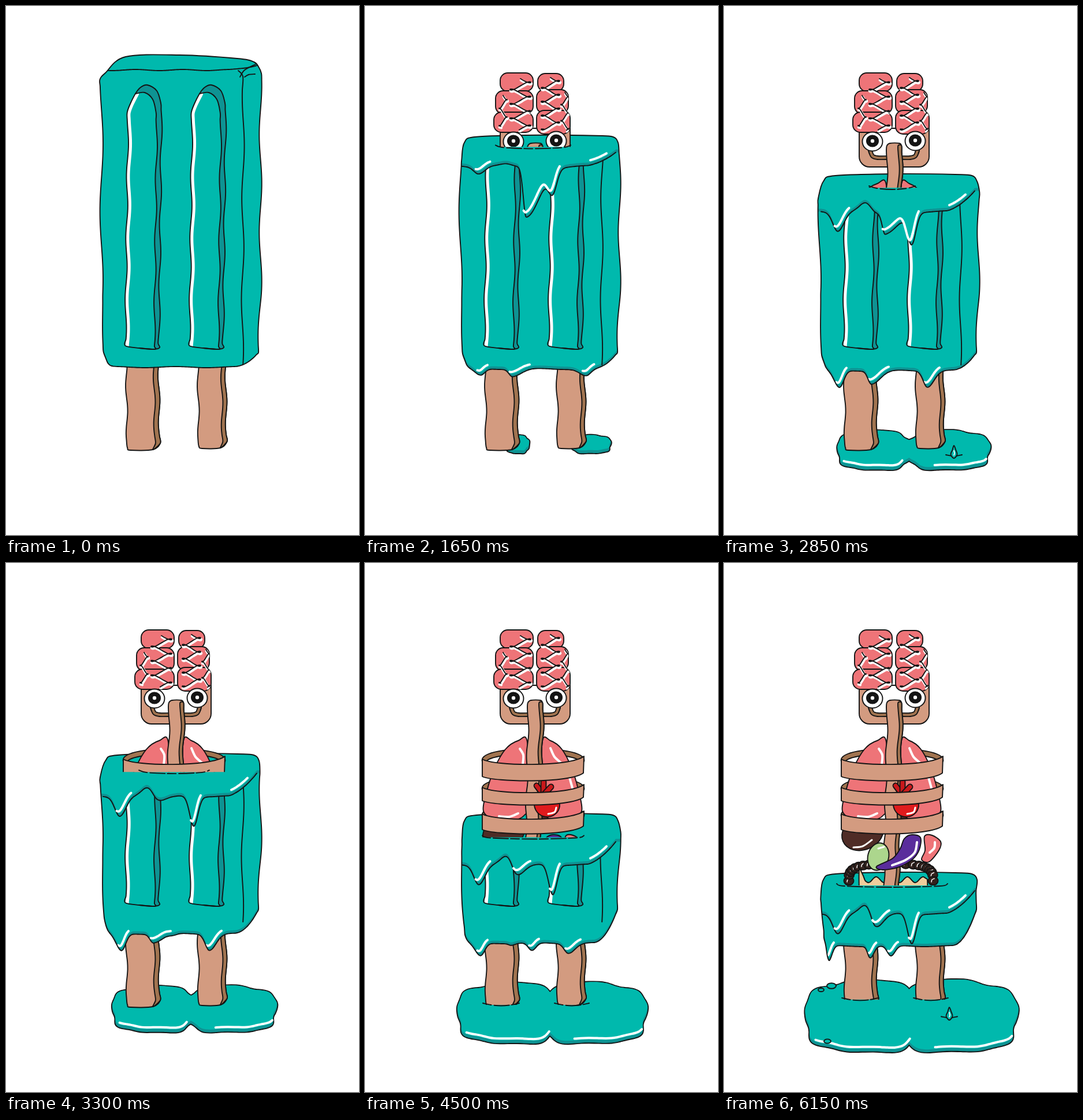
These frames come from a looping animation (611x917 px, 6.3 s). An HTML page with a canvas:

```html
<!DOCTYPE html>
<html lang="en">
<head>
<meta charset="utf-8">
<title>Melting ice pop</title>
<style>
html, body { margin: 0; width: 100%; height: 100%; overflow: hidden; background: #fff; }
canvas { display: block; width: 611px; height: 917px; }
</style>
</head>
<body>
<canvas id="stage" width="611" height="917"></canvas>
<script>
const ctx = document.getElementById('stage').getContext('2d');
const LOOP = 6300, STEP = 150;
const INK = '#141414', TEAL = '#00b9ad', DEEP = '#0e9393', WOOD = '#d39b80', BARK = '#a17450';
const PINK = '#ee7478', WHITE = '#fff', BROWN = '#4f2c26', GUT = '#33221d';
const { sin, cos, exp, min, max, PI } = Math;

// time, back rim, waterline, its half width, front edge, lower edge,
// pool left, pool right, pool half height, reach of each pool lobe past the middle
const keys = [
  [0, 85, 97, 5, 111, 626, 264, 395, 0, -55],
  [900, 191, 206, 69, 237, 628, 264, 395, 0, -55],
  [2250, 250, 275, 62, 310, 630, 229, 450, 28, -21],
  [2850, 291, 315, 40, 356, 632, 196, 461, 34, 6],
  [3900, 382, 425, 89, 469, 657, 167, 479, 48, 22],
  [5100, 486, 526, 87, 577, 661, 152, 498, 57, 25],
  [6150, 536, 559, 96, 608, 664, 140, 509, 62, 30]
];
function stateAt(t) {
  const i = keys.findIndex(key => key[0] > t) - 1;
  const [a, b] = i < 0 ? keys.slice(-2).reverse() : [keys[i], keys[i + 1]];
  const k = (t - a[0]) / (b[0] - a[0]);
  const [, rim, water, waterHalf, front, lower, poolLeft, poolRight, poolHalf, reach] =
    a.map((v, j) => v + (b[j] - v) * k);
  return { t, rim, water, waterHalf, front, lower, poolLeft, poolRight, poolHalf, reach };
}

// A drip swells between `from` and `full`, and may shrink between `fade` and `gone`.
const drip = (x, left, right, depth, from, full, fade = LOOP, gone = LOOP + 1) =>
  ({ x, left, right, depth, from, full, fade, gone });
const frontDrips = [
  drip(197, 12, 15, 34, 900, 2850),
  drip(245, 14, 14, -15, 1200, 2850),
  drip(279, 7, 34, 88, 0, 900, 2250, 3300),
  drip(262, 10, 18, 24, 2400, 5100),
  drip(325, 10, 10, 52, 300, 2250)
];
const lowerDrips = [
  drip(200, 13, 10, 30, 900, 2850, 4200, 5400),
  drip(181, 4, 8, 28, 5000, 6150),
  drip(255, 8, 22, 23, 900, 2250, 3000, 3900),
  drip(253, 6, 9, 20, 4200, 6150),
  drip(289, 9, 10, 18, 3000, 5000),
  drip(383, 16, 11, 22, 900, 2250, 2300, 2850),
  drip(352, 10, 16, 28, 2250, 2850, 3900, 5400)
];
const unit = v => max(0, min(1, v));
const depthAt = (d, t) => d.depth * unit((t - d.from) / (d.full - d.from)) * (1 - unit((t - d.fade) / (d.gone - d.fade)));
const hang = (drips, x, t) => drips.reduce((sum, d) => {
  const u = (x - d.x) / (x < d.x ? d.left : d.right);
  return sum + depthAt(d, t) * exp(-u * u);
}, 0);

const frontEdge = s => x => s.front + sin(x / 13) + hang(frontDrips, x, s.t)
  - min(42, 9 + s.t * 0.01) * unit((x - 385) / 50) ** 1.5;
const lowerEdge = s => x => s.lower + sin(x / 17) + hang(lowerDrips, x, s.t)
  - 14 * exp((173 - x) / 4) - (s.lower - 600) * unit((x - 395) / 42) ** 2;
const leftSide = y => 165.3 + 2.7 * sin((y - 180) / 37.4) + max(0, y - 500) * 0.06;
const rightSide = y => 440.5 + 2.2 * sin((y - 265) / 27) - max(0, y - 500) * 0.03;

function range(from, to, step) {
  const n = max(1, Math.round(Math.abs(to - from) / step));
  return Array.from({ length: n + 1 }, (_, i) => from + (to - from) * i / n);
}
const along = (f, x1, x2, step = 3) => range(x1, x2, step).map(x => [x, f(x)]);
const down = (f, y1, y2, step = 12) => range(y1, y2, step).map(y => [f(y), y]);

function spline(pts, closed = false) {
  const n = pts.length, path = new Path2D();
  const at = i => closed ? pts[(i + n) % n] : pts[max(0, min(n - 1, i))];
  path.moveTo(...pts[0]);
  for (let i = 0; i < (closed ? n : n - 1); i++) {
    const [a, b, c, d] = [at(i - 1), at(i), at(i + 1), at(i + 2)];
    path.bezierCurveTo(b[0] + (c[0] - a[0]) / 6, b[1] + (c[1] - a[1]) / 6,
      c[0] - (d[0] - b[0]) / 6, c[1] - (d[1] - b[1]) / 6, c[0], c[1]);
  }
  if (closed) path.closePath();
  return path;
}
const blob = pts => spline(pts, true);
function oval(x, y, rx, ry = rx, turn = 0) {
  const path = new Path2D();
  path.ellipse(x, y, rx, ry, turn, 0, 2 * PI);
  return path;
}
function box(x1, y1, x2, y2, radius) {
  const path = new Path2D();
  path.roundRect(x1, y1, x2 - x1, y2 - y1, radius);
  return path;
}
function stroke(path, color = INK, width = 1.9) {
  ctx.strokeStyle = color;
  ctx.lineWidth = width;
  ctx.stroke(path);
}
function fill(path, color, rule) {
  ctx.fillStyle = color;
  ctx.fill(path, rule);
}
function shape(path, color, rule) {
  fill(path, color, rule);
  stroke(path);
}
function tube(path, color, width) {
  stroke(path, INK, width + 3.8);
  stroke(path, color, width);
}
function within(path, draw) {
  ctx.save();
  ctx.clip(path);
  draw();
  ctx.restore();
}
// Dark fill with the bright colour lifted, leaving a shaded lower lip.
function glossy(path, lift) {
  fill(path, DEEP);
  within(path, () => {
    ctx.translate(0, -lift);
    fill(path, TEAL);
  });
}
const shine = (pts, width = 4) => stroke(spline(pts), WHITE, width);
function shineDrips(drips, edge, t) {
  for (const d of drips) {
    if (depthAt(d, t) < 9) continue;
    shine(along(edge, d.x - d.left * 0.2, d.x + d.right * 1.5).map(([x, y]) => [x - 3, y - 8]));
  }
}
function dashes(y, x1, x2, sag = 4) {
  ctx.setLineDash([15, 5, 26, 4]);
  stroke(spline([[x1, y - sag], [x1 + 14, y], [(x1 + x2) / 2, y + sag / 2], [x2 - 14, y], [x2, y - sag]]));
  ctx.setLineDash([]);
}

// Wooden bar with a darker right-hand side.
function slab(x, width, side, top, bottom, lean = 0) {
  const edge = dx => y => x + dx + lean * (y - top) + 1.6 * sin((y - 680) / 13 + dx / 40);
  const front = edge(width), back = edge(width + side), left = edge(0);
  const faces = blob([...down(left, top + 5, bottom - 4), [left(bottom) + 5, bottom], [front(bottom) - 5, bottom - 1],
    ...down(back, bottom - 12, top + 5), [back(top) - 4, top], [left(top) + 5, top]]);
  const shade = blob([...down(front, top + 4, bottom - 12), [front(bottom) - 5, bottom - 1],
    ...down(back, bottom - 12, top + 4)]);
  return () => {
    shape(faces, WOOD);
    shape(shade, BARK);
  };
}
const sticks = [slab(208, 48, 8, 600, 770, 0.01), slab(332, 41, 7, 600, 767, 0.01)];

function drawSticks(t) {
  const wet = t > 3300, level = wet ? 766 - max(0, t - 5100) / 115 : 780;
  within(box(0, 0, 611, level, 0), () => sticks.forEach(draw => draw()));
  if (wet) [[204, 267], [328, 388]].forEach(span => dashes(level, ...span, 3));
}

function lobe(x1, x2, half, seed) {
  const cx = (x1 + x2) / 2, cy = 751 + half * 0.57;
  const round = v => Math.sign(v) * Math.abs(v) ** 0.78;
  return range(0, 2 * PI, 0.1).slice(0, -1).map(a => {
    const r = 1 + 0.035 * sin(5 * a + seed) + 0.025 * sin(9 * a - seed);
    return [cx + (x2 - x1) / 2 * r * round(cos(a)), cy + half * r * round(sin(a))];
  });
}
function drawPools({ t, poolLeft, poolRight, poolHalf, reach }) {
  if (poolHalf < 5) return;
  const lobes = [lobe(poolLeft, 320 + reach, poolHalf, 2), lobe(320 - reach, poolRight, poolHalf, 4)];
  const whole = new Path2D();
  lobes.forEach(pts => whole.addPath(blob(pts)));
  stroke(whole, INK, 3.8);
  glossy(whole, 5);
  if (poolHalf > 18) lobes.forEach((pts, i) => shine(pts.slice(8 - 2 * i, 25 - 6 * i).map(([x, y]) => [x, y - 8])));
  if (t > 4700) [[186, 733, 8], [168, 740, 5], [179, 829, 6]].forEach(([x, y, r]) => shape(oval(x, y, r, r * 0.6), TEAL));
}

function makeGroove(x) {
  const edge = dx => y => x + dx - 0.011 * (y - 200) + 1.5 * sin(y / 17 + dx);
  const left = [...down(edge(0), 589, 185), [x + 3, 172], [x + 13, 152]];
  const inner = [[x + 29, 150], [x + 43, 162], ...down(edge(50), 185, 590), [x + 47, 595], [x + 20, 593]];
  const outer = [[x + 22, 141], [x + 34, 137], [x + 50, 147], ...down(edge(58), 168, 585), [x + 55, 592], [x + 45, 595], [x + 20, 593]];
  return { left: spline(left), inner: spline([left[left.length - 1], ...inner]),
    face: spline([...left, ...inner]), hole: blob([...left, ...outer]) };
}
const grooves = [makeGroove(211), makeGroove(322)];
function drawGroove({ left, inner, face, hole }) {
  fill(hole, DEEP);
  fill(face, TEAL);
  within(face, () => stroke(left, WHITE, 12));
  stroke(inner);
  stroke(hole);
}
const sideEdge = spline([[402, 112], [410, 122], ...down(y => 411.5 + 2 * sin((y - 200) / 28) - y / 250, 145, 622)]);
const cornerMarks = [spline([[405, 123], [413, 111], [432, 101]]), spline([[413, 123], [420, 119], [431, 118]])];

function drawBody(s) {
  const { t, rim } = s;
  const front = frontEdge(s), lower = lowerEdge(s), slant = 1 - unit(t / 900);
  const body = blob([...along(lower, 173, 437), ...down(rightSide, 588, rim + 32),
    [438, rim + 13 + 9 * slant], [429, rim + 3 + 9 * slant], [400, rim + 1 + 5 * slant], [300, rim],
    [193 + 14 * slant, rim + 3], [172, rim + 13 + 18 * slant], ...down(leftSide, rim + 42, lower(173) - 12)]);
  glossy(body, min(5, t / 300));

  within(body, () => {
    if (t < 4650) grooves.forEach(drawGroove);
    if (t < 5500) stroke(sideEdge);
    const edge = along(front, 168, 434, 2);
    const cover = spline(edge);
    cover.lineTo(611, front(434));
    [[611, 0], [0, 0], [0, front(168)]].forEach(p => cover.lineTo(...p));
    cover.closePath();
    glossy(cover, min(5, t / 160));
    stroke(spline(edge));
    if (t < 150) cornerMarks.forEach(mark => stroke(mark));
    shineDrips(frontDrips, front, t);
    if (t > 1500) shine(along(front, 392, 420).map(([x, y]) => [x - 2, y - 8]));
    shineDrips(lowerDrips, lower, t);
  });
  stroke(body);
}

const mirror = (pts, axis, scale = 1) => pts.map(([x, y]) => [axis + (axis - x) * scale, y]);
const eyes = [[257, 235], [331, 234]];
const lungPts = [[281, 311], [265, 308], [243, 323], [224, 356], [211, 395], [205, 430], [225, 445], [257, 446], [276, 437], [281, 418]];
const grinPts = [[253, 250], [257, 260], [266, 263], [285, 263]];
const brainLobes = [
  [[234, 116, 291, 148], [226, 147, 291, 187], [223, 184, 291, 219]],
  [[299, 117, 344, 148], [297, 145, 352, 186], [297, 181, 355, 222]]
];
// Serpentine crease with bulging bends.
const crease = (cx, swing, wave, top, bottom) => spline(range(0, bottom - top, 2).map(d => {
  const a = 2 * PI * d / wave;
  return [cx + swing * sin(a), top + d + 3.5 * sin(2 * a)];
}));
const creases = [
  [crease(269, 18, 25, 126, 214), crease(239, 7, 30, 155, 212)],
  [crease(321, 16, 24, 124, 217), crease(346, 7, 28, 150, 218)]
];
const purplePts = [[340, 476], [325, 471], [312, 478], [305, 495], [292, 512], [264, 526], [275, 532], [303, 527], [326, 514], [338, 497]];
const pinkPts = [[347, 474], [360, 472], [375, 483], [372, 498], [355, 518], [342, 514], [348, 498]];
const ribs = [[342, 28], [391, 21], [437, 25]];
const spine = slab(283, 20, 6, 238, 580, -0.02);

function ribBack(y) {
  const ring = new Path2D();
  ring.ellipse(291, y, 84, 16, 0, PI, 0);
  tube(ring, BARK, 7);
}
function ribFront(y, height) {
  const band = new Path2D(), low = y + height;
  band.moveTo(203, y - 2);
  band.bezierCurveTo(222, y + 10, 355, y + 12, 379, y - 7);
  band.lineTo(378, low - 6);
  band.bezierCurveTo(355, low + 12, 222, low + 10, 203, low);
  band.closePath();
  shape(band, WOOD);
}

function drawHead() {
  const jaw = box(234, 212, 355, 279, [0, 0, 18, 18]);
  jaw.addPath(box(250, 212, 338, 263, [0, 0, 14, 14]));
  shape(jaw, WOOD, 'evenodd');
  [grinPts, mirror(grinPts, 294)].forEach(pts => tube(spline(pts), BARK, 4));
  brainLobes.forEach((half, i) => {
    const whole = new Path2D();
    half.forEach(lobeBox => {
      const part = box(...lobeBox, 13);
      shape(part, PINK);
      whole.addPath(part);
    });
    within(whole, () => creases[i].forEach(line => {
      ctx.translate(1, 2.5);
      stroke(line, WHITE, 4.5);
      ctx.translate(-1, -2.5);
      stroke(line);
    }));
  });
  for (const [x, y] of eyes) {
    shape(oval(x, y, 17.5, 16.5), WHITE);
    fill(oval(x, y - 1, 11, 10.5), INK);
    fill(oval(x, y - 1, 3.2), WHITE);
  }
}

function drawGuts() {
  for (const a of range(0, PI, PI / 18)) {
    const x = 289 - 73 * Math.sign(cos(a)) * Math.abs(cos(a)) ** 0.6, y = 551 - 29 * sin(a) ** 0.6;
    shape(oval(x, y, 8.5, 7.5), GUT);
    shine([[x - 3, y + 2], [x - 2, y - 2], [x + 2, y - 4]], 1.5);
  }
  shape(spline([[234, 572], [234, 532], [240, 540], ...along(x => 549 + 5 * sin(x / 4.3), 244, 352), [352, 572]]), '#efcd9c');
}

function drawFigure() {
  ribs.forEach(([y]) => ribBack(y));
  shape(oval(312, 445, 11, 9), BROWN);
  shape(oval(240, 468, 37, 29, -0.4), BROWN);
  shine([[224, 493], [240, 491], [256, 480]], 3);
  [lungPts, mirror(lungPts, 294.5, 0.9)].forEach(pts => shape(blob(pts), PINK));
  shine([[268, 322], [274, 333], [273, 350]]);
  shine([[321, 321], [328, 336], [339, 346]]);
  shine([[232, 439], [250, 440], [265, 434]]);
  shine([[354, 372], [359, 390]]);
  drawGuts();
  drawHead();
  spine();
  [[297, 386], [309, 379], [322, 388]].forEach(tip => tube(spline([tip, [309, 402]]), '#c9181b', 7));
  shape(oval(315, 419, 22, 21, 0.3), '#e01b1d');
  shine([[317, 435], [328, 432], [331, 424]], 3);
  ribs.forEach(rib => ribFront(...rib));
  shape(oval(267, 509, 18, 24, 0.25), '#acd68d');
  shine([[267, 495], [277, 492]], 3);
  shape(blob(purplePts), '#5a2d9c');
  shine([[334, 484], [330, 502], [314, 515], [291, 524]]);
  shape(blob(pinkPts), PINK);
  shine([[365, 484], [364, 494], [356, 502]]);
}

function tear(x, y, size) {
  shape(blob([[0, -1], [0.3, -0.3], [0.5, 0.4], [0, 1], [-0.5, 0.4], [-0.25, -0.3]]
    .map(([dx, dy]) => [x + dx * size, y + dy * size])), TEAL);
  shine([[x, y - size * 0.2], [x + 1, y + size * 0.2], [x, y + size * 0.5]], size / 6);
}
// x and landing time of each falling drop
const drops = [[383, 1100], [397, 2200], [398, 2800], [205, 3990], [294, 5050], [390, 6100]];
function drawDrop(t, [x, land]) {
  const p = (t - land) / 450 + 1, floor = 766 + land / 400;
  if (p > 0 && p < 1) tear(x, 650 + (floor - 650) * p * p, 18);
  if (p >= 1 && t < land + 250) {
    dashes(floor + 8, x - 14, x + 14, 3);
    tear(x, floor, 11);
  }
}

function draw(t) {
  const s = stateAt(t);
  ctx.fillStyle = WHITE;
  ctx.fillRect(0, 0, 611, 917);
  ctx.lineCap = ctx.lineJoin = 'round';
  drawPools(s);
  drawSticks(t);
  drawBody(s);
  if (t >= 150) {
    within(box(0, 0, 611, s.water, 0), drawFigure);
    dashes(s.water + 1, 291 - s.waterHalf, 291 + s.waterHalf);
  }
  drops.forEach(d => drawDrop(t, d));
}

function tick() {
  draw(Math.floor(performance.now() % LOOP / STEP) * STEP);
  requestAnimationFrame(tick);
}
tick();
</script>
</body>
</html>
```
